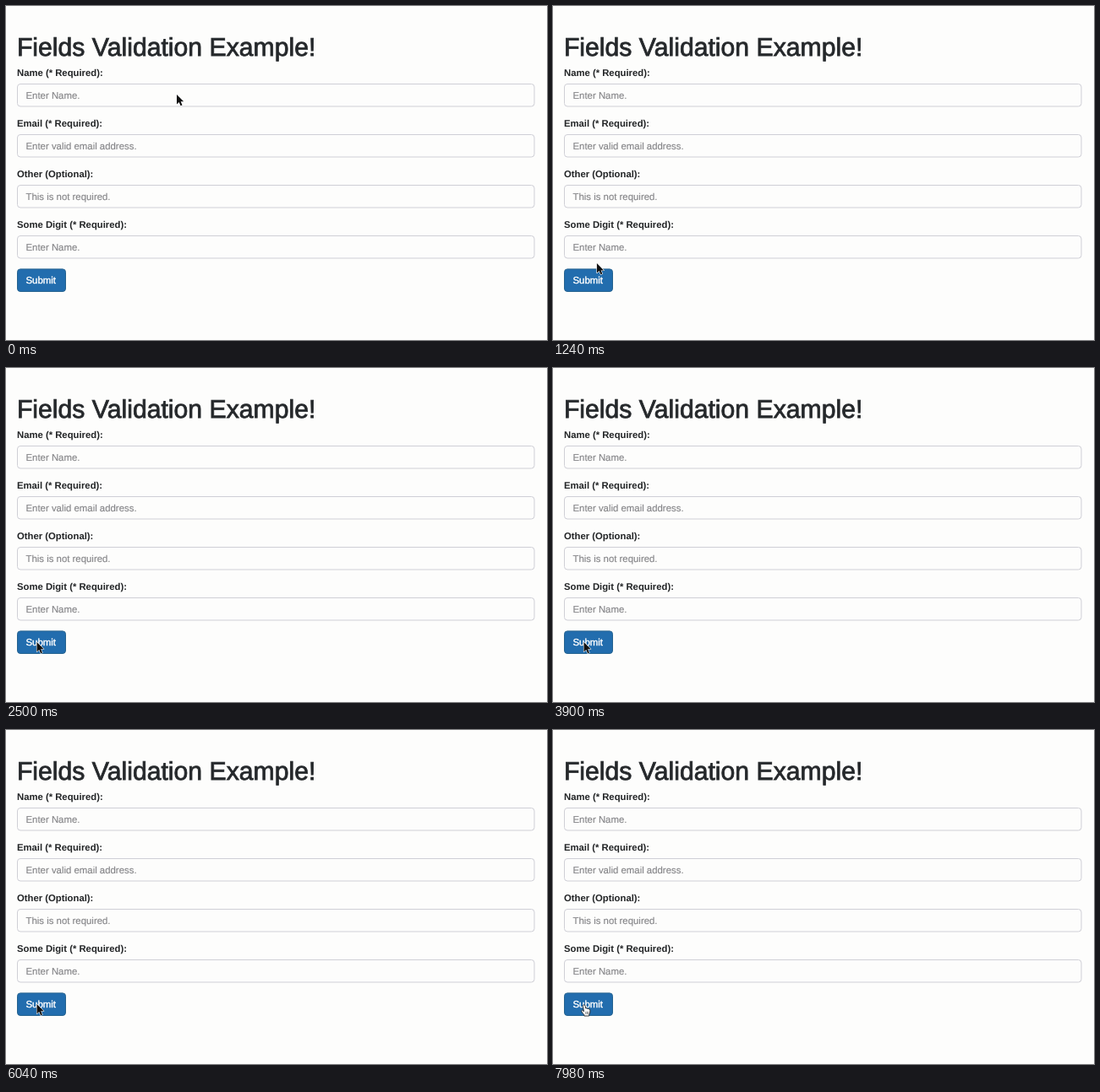
An HTML page for the animation above (8 s loop, 640 px wide and 396 px high).

```html
<!DOCTYPE html>
<html lang="en">
<head>
<meta charset="utf-8">
<title>Fields Validation Example</title>
<style>
  html, body { margin: 0; width: 100%; height: 100%; overflow: hidden; background: #fdfdfc; }
  svg { display: block; width: 100%; height: 100%; }
  text { font: 11.4px "Liberation Sans", Arial, sans-serif; text-rendering: geometricPrecision; }
  .title { font-size: 30.2px; fill: #25282b; stroke: #25282b; stroke-width: .8px; }
  .label { font-size: 11.3px; font-weight: bold; fill: #222426; }
  .hint { fill: #858588; stroke: #858588; stroke-width: .15px; }
  .box { fill: #fdfdfc; stroke: #cfcfd6; }
  .button { fill: #226dae; stroke: #24628f; }
  .caption { fill: #fff; stroke: #fff; stroke-width: .4px; }
</style>
</head>
<body>
<svg viewBox="0 0 640 396">
  <rect width="640" height="396" fill="#fdfdfc"/>
  <text class="title" x="12.9" y="58.7">Fields Validation Example!</text>
  <g id="fields"></g>
  <rect class="button" x="13.5" y="311.9" width="57" height="26.6" rx="3.5"/>
  <text class="caption" x="23.5" y="329">Submit</text>
  <g id="cursor" stroke-linejoin="round" stroke-linecap="round">
    <path id="arrow" d="M0 0V11.4L2.7 9L4.6 13.2L6.5 12.4L4.7 8.3H8.2Z"
      fill="#111" stroke="#fff" stroke-width="1.1" paint-order="stroke"/>
    <g id="hand">
      <path d="M-1 2.2Q-1 .8 .2 .8Q1.3 .8 1.6 2.2L2.2 5Q3.6 4.2 4.2 5.4Q5.4 4.8 6 6Q7.2 5.7 7.4 7.2
        Q7.7 10.3 6.2 12.4V14H.4V12.7Q-1.4 11-2.6 8.9Q-3.2 7.6-2.1 7.3Q-1.2 7.2-.2 8.5Z"
        fill="#fff" stroke="#222" stroke-width=".9"/>
      <path d="M2.3 9.2V11.6M3.8 9.2V11.6M5.3 9.2V11.6" fill="none" stroke="#333" stroke-width=".6"/>
    </g>
  </g>
</svg>
<script>
const LOOP = 8000, HAND_AT = 7640;
const byId = id => document.getElementById(id);
const cursor = byId("cursor"), arrow = byId("arrow"), hand = byId("hand");

const fields = [
  ["Name (* Required):", "Enter Name."],
  ["Email (* Required):", "Enter valid email address."],
  ["Other (Optional):", "This is not required."],
  ["Some Digit (* Required):", "Enter Name."]
];
byId("fields").innerHTML = fields.map(([label, hint], i) => `
  <g transform="translate(0 ${i * 60})">
    <text class="label" x="13" y="83.4">${label}</text>
    <rect class="box" x="13.5" y="92.5" width="611.5" height="26.5" rx="3.5"/>
    <text class="hint" x="23.5" y="109.7">${hint}</text>
  </g>`).join("");

// time, x, y, then velocity in px per ms
const path = [
  [0, 202, 105, 0, 0],
  [580, 186, 135, -.07, .12],
  [1240, 52, 305, -.09, .12],
  [1560, 36.5, 325, 0, 0]
];

function hermite(u, span, a, b, va, vb) {
  const u2 = u * u, u3 = u2 * u;
  return (2 * u3 - 3 * u2 + 1) * a + (u3 - 2 * u2 + u) * span * va
    + (3 * u2 - 2 * u3) * b + (u3 - u2) * span * vb;
}

function position(t) {
  const i = path.findIndex(p => p[0] > t);
  if (i < 0) return path[path.length - 1].slice(1, 3);
  const a = path[i - 1], b = path[i], span = b[0] - a[0], u = (t - a[0]) / span;
  return [1, 2].map(k => hermite(u, span, a[k], b[k], a[k + 2], b[k + 2]));
}

function draw(t) {
  const [x, y] = position(t), pointing = t >= HAND_AT;
  cursor.setAttribute("transform", `translate(${x.toFixed(2)} ${y.toFixed(2)})`);
  arrow.style.display = pointing ? "none" : "";
  hand.style.display = pointing ? "" : "none";
}

const start = performance.now();
function tick() {
  draw((performance.now() - start) % LOOP);
  requestAnimationFrame(tick);
}
tick();
</script>
</body>
</html>
```
